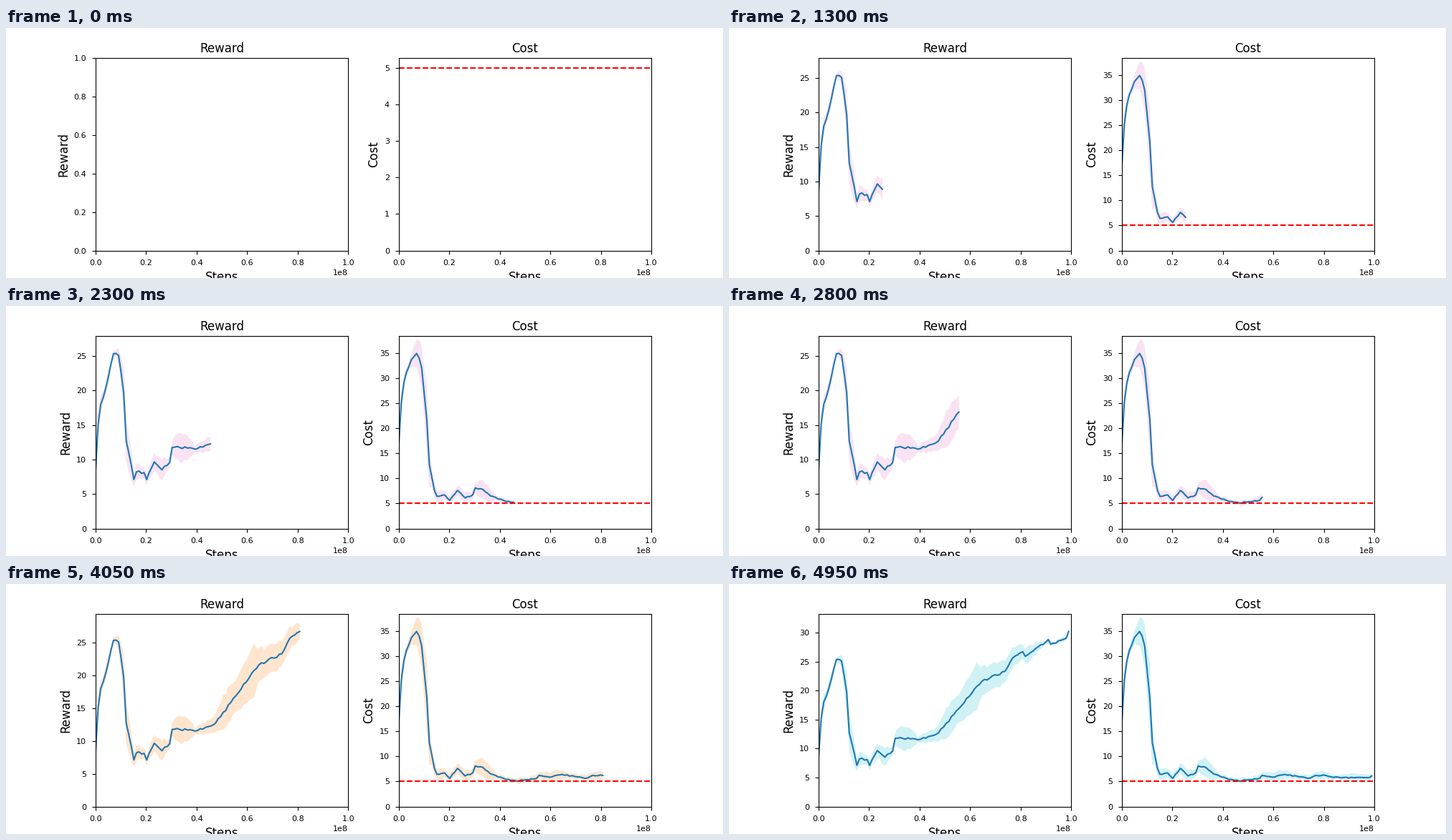
These frames come from a looping animation (1000 by 350 pixels, 5000 ms). A matplotlib script:

```python
import numpy as np
import matplotlib.pyplot as plt
from matplotlib.animation import FuncAnimation

FRAMES = 100
LIMIT = 5
INDEX = np.arange(FRAMES)
STEPS = np.linspace(0, 1e8, FRAMES)

plt.rcParams.update({
    "font.family": "DejaVu Sans",
    "axes.titlesize": 12, "axes.labelsize": 12,
    "xtick.labelsize": 8, "ytick.labelsize": 8,
    "xtick.major.pad": 5.7, "ytick.major.pad": 5.7,
})


def jagged(points, jitter, seed):
    """Join (index, value) points by lines, with small jitter between them."""
    index, value = zip(*points)
    noise = np.random.default_rng(seed).uniform(-jitter, jitter, FRAMES)
    noise[list(index)] = 0
    return np.interp(INDEX, index, value) + noise


reward = jagged([
    (0, 8.5), (1, 15.2), (2, 18), (4, 20.4), (7, 25.35), (9, 25.1),
    (11, 19.7), (12, 12.7), (15, 7.1), (16, 8.2), (19, 8.1), (20, 7.1),
    (23, 9.65), (26, 8.5), (29, 9.55), (30, 11.75), (40, 11.6), (47, 12.7),
    (55, 16.9), (64, 21.6), (73, 23.3), (76, 25.6), (80, 26.69), (81, 25.9),
    (90, 28.77), (91, 28), (97, 29), (98, 30.18)], 0.2, 4)

reward_spread = jagged([
    (0, 2), (3, .8), (5, 1.2), (7, .4), (9, 1), (11, 3.5), (14, 2.2),
    (15, 1), (21, .9), (26, 1.5), (29, .8), (33, 2.1), (36, 1.8), (39, .4),
    (46, 1.2), (50, 2.7), (55, 2.4), (62, 4.2), (64, 2.5), (75, 1.7),
    (85, 1.1), (88, .4), (98, .5)], 0.25, 2)

cost = jagged([
    (0, 16.3), (1, 25.1), (2, 29), (3, 31.1), (5, 33.7), (7, 34.9),
    (8, 34), (9, 32), (11, 21.8), (12, 12.7), (14, 7.6), (15, 6.4),
    (18, 6.7), (20, 5.6), (23, 7.6), (26, 6.1), (29, 6.7), (30, 8.1),
    (33, 7.8), (36, 6.5), (42, 5.4), (46, 5.1), (54, 5.6), (55, 6.2),
    (59, 5.85), (64, 6.4), (73, 5.6), (76, 6.2), (80, 6.2), (83, 5.8),
    (97, 5.75), (98, 6.1)], 0.12, 3)

cost_spread = jagged([
    (0, 2.5), (3, .8), (5, 1.3), (8, 3.6), (10, 5.2), (11, 7), (13, 1.9),
    (15, 1), (21, .8), (24, 1.2), (29, .8), (33, 1.9), (36, 1.3), (38, .5),
    (50, .5), (62, 1), (68, .5), (79, .8), (84, .4), (90, .9),
    (98, .5)], 0.15, 4)


class Panel:
    def __init__(self, ax, name, mean, spread, empty_top):
        self.ax, self.mean, self.empty_top = ax, mean, empty_top
        self.low, self.high = mean - spread, mean + spread
        self.line, = ax.plot([], [], color="C0")
        self.band = None
        ax.set(title=name, xlabel="Steps", ylabel=name, xlim=(0, 1e8))

    def show(self, count):
        if self.band:
            self.band.remove()
            self.band = None
        shown = slice(count)
        self.line.set_data(STEPS[shown], self.mean[shown])
        if count:
            # the band takes the next colour of the cycle at every step
            self.band = self.ax.fill_between(
                STEPS[shown], self.low[shown], self.high[shown],
                alpha=0.2, facecolor=f"C{count % 10}")
        top = 1.1 * self.mean[shown].max() if count else self.empty_top
        self.ax.set_ylim(0, top)


fig, (left, right) = plt.subplots(1, 2, figsize=(10, 3.5), dpi=100)
panels = [Panel(left, "Reward", reward, reward_spread, 1),
          Panel(right, "Cost", cost, cost_spread, 5.275)]
right.axhline(LIMIT, color="r", linestyle="--")


def update(frame):
    for panel in panels:
        panel.show(frame)


anim = FuncAnimation(fig, update, frames=FRAMES, init_func=lambda: update(0),
                     interval=50, repeat=True, repeat_delay=0)
plt.show()
```
